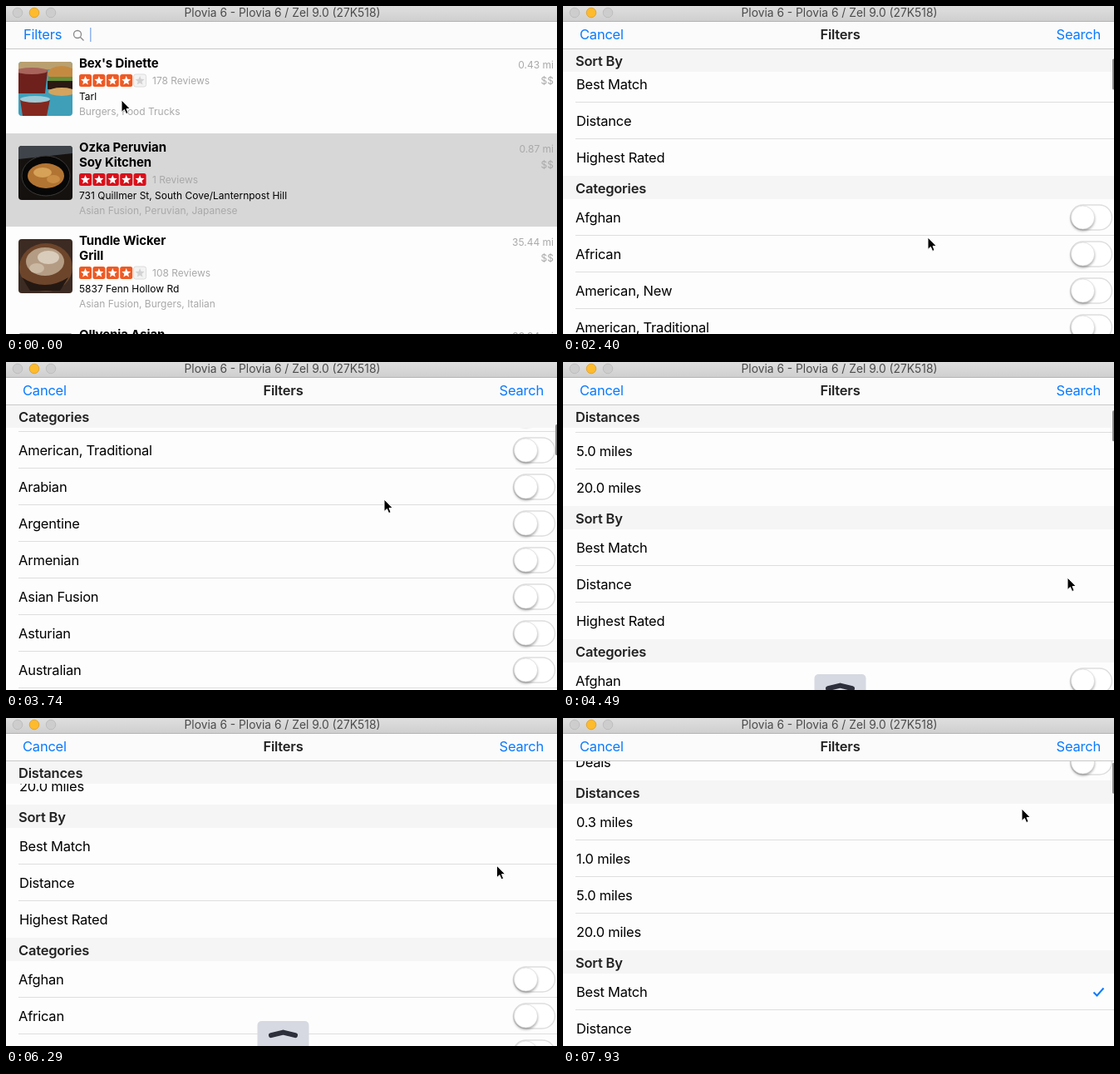
Animation of 663 by 394 pixels, one loop 8000 ms. Source, as an HTML page:

```html
<!DOCTYPE html>
<html lang="en">
<head>
<meta charset="utf-8">
<title>Search filters</title>
<style>
html, body { margin: 0; width: 100%; height: 100%; overflow: hidden; background: #fdfdfd; }
svg { display: block; }
text { font: 16.5px Inter, Roboto, sans-serif; letter-spacing: -.22px; white-space: pre; }
.head { font-weight: 600; fill: #222; }
.blue { fill: #0a7aff; }
.name { font-size: 15px; font-weight: 700; letter-spacing: -.1px; }
.small { font-size: 12px; letter-spacing: 0; }
.dim { fill: #a9a9a9; }
.end { text-anchor: end; }
.mid { text-anchor: middle; }
.bar { font-size: 13.8px; letter-spacing: 0; fill: #4b4b4b; }
.knob { filter: drop-shadow(0 2px 1.5px #0005); }
</style>
</head>
<body>
<svg id="stage" width="663" height="394" viewBox="0 0 663 394">
  <defs>
    <linearGradient id="chrome" x2="0" y2="1">
      <stop stop-color="#dfdfdf"/><stop offset="1" stop-color="#cfcfcf"/>
    </linearGradient>
    <clipPath id="thumb"><rect width="65" height="65" rx="4"/></clipPath>
    <g id="switch">
      <rect x="610.5" y="-15" width="50" height="30" rx="15" fill="#fff" stroke="#dedede" stroke-width="1.4"/>
      <circle class="knob" cx="625.5" r="14" fill="#fff" stroke="#d4d4d4" stroke-width=".6"/>
    </g>
    <path id="star" d="M7.5 2L9 5.8 13 6.1 9.9 8.7 10.9 12.6 7.5 10.5 4.1 12.6 5.1 8.7 2 6.1 6 5.8Z"/>
    <g id="food0">
      <rect width="65" height="65" fill="#3f9fb9"/>
      <rect width="65" height="9" fill="#b9a070"/>
      <path d="M0 10H35L32 38H0Z" fill="#6d201c"/>
      <ellipse cx="16" cy="11" rx="19" ry="4" fill="#a8645a"/>
      <ellipse cx="52" cy="14" rx="17" ry="9" fill="#c58a41"/>
      <rect x="36" y="18" width="29" height="6" fill="#688d3a"/>
      <rect x="35" y="23" width="30" height="10" fill="#2a1813"/>
      <ellipse cx="52" cy="36" rx="16" ry="5" fill="#d2a45f"/>
      <path d="M2 45H38L34 65H5Z" fill="#84281f"/>
      <ellipse cx="20" cy="45" rx="18" ry="4" fill="#9ccbd7"/>
    </g>
    <g id="food1">
      <rect width="65" height="65" fill="#14110f"/>
      <path d="M0 0H65V9L0 16Z" fill="#3f444a"/>
      <ellipse cx="33" cy="36" rx="29" ry="24" fill="#070707" stroke="#3c3a38"/>
      <ellipse cx="33" cy="36" rx="22" ry="15" fill="#b27432"/>
      <ellipse cx="29" cy="32" rx="11" ry="6" fill="#d5a258"/>
      <ellipse cx="42" cy="40" rx="8" ry="5" fill="#c98d46"/>
    </g>
    <g id="food2">
      <rect width="65" height="65" fill="#3c2b23"/>
      <ellipse cx="33" cy="34" rx="32" ry="29" fill="#6d452b"/>
      <ellipse cx="32" cy="27" rx="23" ry="17" fill="#b49c84"/>
      <ellipse cx="36" cy="22" rx="13" ry="8" fill="#d9ccba"/>
      <ellipse cx="22" cy="35" rx="9" ry="6" fill="#cbb9a3"/>
      <path d="M4 46Q32 64 60 46L50 62H14Z" fill="#241813"/>
    </g>
  </defs>
  <g id="places"></g>
  <g id="modal"></g>
  <g id="tab">
    <rect x="302.5" width="62" height="40" rx="5" fill="#d6d9e1"/>
    <path d="M319 17.2L333.5 13.6 348 17.2" fill="none" stroke="#2d303b" stroke-width="6" stroke-linecap="round" stroke-linejoin="round"/>
  </g>
  <rect width="663" height="18" fill="url(#chrome)"/>
  <rect y="18" width="663" height="1" fill="#b4b4b4"/>
  <g stroke="#b9b9b9" stroke-width=".8" fill="#cdcdcd">
    <circle cx="14" cy="8" r="5.8"/><circle cx="54" cy="8" r="5.8"/>
    <circle cx="34" cy="8" r="5.8" fill="#fdbb2d" stroke="#dd9d25"/>
  </g>
  <text class="bar mid" x="332.5" y="13.3">Plovia 6 - Plovia 6 / Zel 9.0 (27K518)</text>
  <path id="cursor" d="M0 0V14.5L3.4 11.5 5.6 16.6 8.1 15.5 6 10.5H10.3Z" stroke="#fff" stroke-width="1"/>
</svg>
<script>
const $ = id => document.getElementById(id);
const text = (x, y, str, cls = '') => `<text x="${x}" y="${y}" class="${cls}">${str}</text>`;
const rect = (x, y, w, h, fill, more = '') =>
  `<rect x="${x}" y="${y}" width="${w}" height="${h}" fill="${fill}" ${more}/>`;
const move = (id, x, y) => $(id).setAttribute('transform', `translate(${x} ${y})`);

const TOP = 51, ROW = 44, HEAD = 28;
const navBar = rect(0, 18, 663, 33, '#fbfbfb') + rect(0, TOP, 663, 1, '#c9c9c9');

// Results list
function stars(y, full, color) {
  let out = '';
  for (let i = 0; i < 5; i++) {
    const on = i < full;
    out += `<g transform="translate(${88 + i * 16.4} ${y})">` +
      rect(0, 0, 15, 15, on ? color : '#f3f3f3', `rx="2.5" stroke="${on ? 'none' : '#dcdcdc'}"`) +
      `<use href="#star" fill="${on ? '#fff' : '#d2d2d2'}"/></g>`;
  }
  return out;
}

function place(p, i) {
  const extra = (p.name.length - 1) * 18;
  return `<g transform="translate(0 ${p.y})">` +
    (p.picked ? rect(0, 0, 663, 112, '#d7d7d7') : '') +
    `<g transform="translate(15 15)" clip-path="url(#thumb)"><use href="#food${i % 3}"/></g>` +
    p.name.map((line, k) => text(88, 22 + k * 17.5, line, 'name')).join('') +
    stars(30 + extra, p.stars, p.color) +
    text(176, 42 + extra, p.reviews + ' Reviews', 'small dim') +
    text(88, 60.5 + extra, p.street, 'small') +
    text(88, 78.5 + extra, p.kind, 'small dim') +
    text(659, 22.5, p.miles + ' mi', 'small dim end') +
    text(659, 41.5, '$$', 'small dim end') + '</g>';
}

const orange = '#ee5a24', red = '#d9101a';
$('places').innerHTML = rect(0, 0, 663, 394, '#fdfdfd') + [
  { y: 52, name: ["Bex's Dinette"], stars: 4, color: orange, reviews: 178, street: 'Tarl', kind: 'Burgers, Food Trucks', miles: '0.43' },
  { y: 153, name: ['Ozka Peruvian', 'Soy Kitchen'], stars: 5, color: red, reviews: 1, picked: true,
    street: '731 Quillmer St, South Cove/Lanternpost Hill', kind: 'Asian Fusion, Peruvian, Japanese', miles: '0.87' },
  { y: 265, name: ['Tundle Wicker', 'Grill'], stars: 4, color: orange, reviews: 108,
    street: '5837 Fenn Hollow Rd', kind: 'Asian Fusion, Burgers, Italian', miles: '35.44' },
  { y: 378, name: ['Ollvenia Asian'], stars: 4, color: orange, reviews: 64, street: '', kind: '', miles: '33.34' }
].map(place).join('') + navBar + text(21, 40, 'Filters', 'blue') +
  '<path d="M89.5 37.5L93.5 41.5M90.5 34a4.5 4.5 0 1 1-9 0a4.5 4.5 0 1 1 9 0" fill="none" stroke="#8a8a8a" stroke-width="1.3"/>' +
  rect(101, 26, 1.5, 17, '#8fb4f0');

// Filter sheet
const sections = [
  { rows: ['Deals'], toggle: true },
  { title: 'Distances', rows: ['0.3 miles', '1.0 miles', '5.0 miles', '20.0 miles'] },
  { title: 'Sort By', rows: ['Best Match', 'Distance', 'Highest Rated'] },
  { title: 'Categories', toggle: true, rows: ['Afghan', 'African', 'American, New', 'American, Traditional', 'Arabian',
    'Argentine', 'Armenian', 'Asian Fusion', 'Asturian', 'Australian', 'Austrian', 'Baguettes', 'Barbeque', 'Basque', 'Bavarian'] }
];
let rows = '', heads = '', y = 0;
for (const s of sections) {
  s.top = y;
  if (s.title) {
    heads += `<g id="${s.title}">` + rect(0, 0, 663, HEAD, '#f5f5f5') + text(15, 20.5, s.title, 'head') + '</g>';
    y += HEAD;
  }
  s.rows.forEach((label, i) => {
    if (label === 'Best Match') {
      rows += rect(0, y, 663, ROW, '#d9d9d9', 'id="press"') +
        `<path id="check" d="M638.5 ${y + 22.5}l4 4 8-9" fill="none" stroke="#0a7aff" stroke-width="2"/>`;
    }
    rows += text(s.toggle ? 15 : 16, y + 28, label);
    if (s.toggle) rows += `<use href="#switch" y="${y + 22}"/>`;
    y += ROW;
    if (i < s.rows.length - 1) rows += rect(15, y - 1, 648, 1, '#dedede');
  });
  s.end = y;
}
$('modal').innerHTML = rect(0, 18, 663, 400, '#fdfdfd') +
  `<g id="list">${rows}${heads}</g>` + navBar +
  text(20, 40, 'Cancel', 'blue') + text(333.5, 40, 'Filters', 'head mid') + text(647, 40, 'Search', 'blue end') +
  rect(661, 0, 3, 37, '#8c8c8c', 'rx="1.5" id="scroll"');

// Keys are [step, value, ...]; eased in between
function at(keys, n, k = 1) {
  let i = 0;
  while (i < keys.length - 1 && keys[i + 1][0] <= n) i++;
  const a = keys[i], b = keys[i + 1] || a;
  const u = b === a ? 0 : Math.max(0, (n - a[0]) / (b[0] - a[0]));
  return a[k] + (b[k] - a[k]) * u * u * (3 - 2 * u);
}

const pointer = [[1, 139, 113], [3, 48, 34], [4, 48, 34], [8, 581, 208], [9, 560, 240], [10, 560, 240],
  [14, 440, 310], [21, 435, 148], [25, 455, 165], [30, 607, 259], [33, 607, 275], [36, 589, 220],
  [40, 590, 185], [41, 590, 185], [44, 592, 155], [48, 613, 243], [49, 613, 243], [53, 552, 109]];
const scroll = [[11, 0], [21, 510], [24, 535], [26, 535], [30, 126], [33, 122], [36, 194], [38, 195], [49, 195], [53, 19.6]];
const press = [[42, 0], [43, 1], [44, 1], [46, 0]];
const tab = [[28, 396], [30, 375], [31, 364], [49, 364], [51, 396]];

function draw(ms) {
  const n = Math.floor((ms % 8000 + 8) / 149.6);
  const s = Math.round(at(scroll, n));
  move('modal', 0, n < 4 ? 394 : Math.round(376 * Math.exp((3.35 - n) / .785)));
  move('list', 0, TOP - s);
  for (const h of sections) {
    if (h.title) move(h.title, 0, Math.max(h.top, Math.min(s, h.end - HEAD)));
  }
  move('scroll', 0, 53 + s * .041);
  $('scroll').style.opacity = n > 11 && n < 40 || n > 46 ? 1 : 0;
  $('press').style.opacity = at(press, n);
  $('check').style.opacity = n >= 44 ? 1 : 0;
  move('tab', 0, at(tab, n));
  move('cursor', at(pointer, n), at(pointer, n, 2));
}

function loop() {
  draw(performance.now());
  requestAnimationFrame(loop);
}
loop();
</script>
</body>
</html>
```
